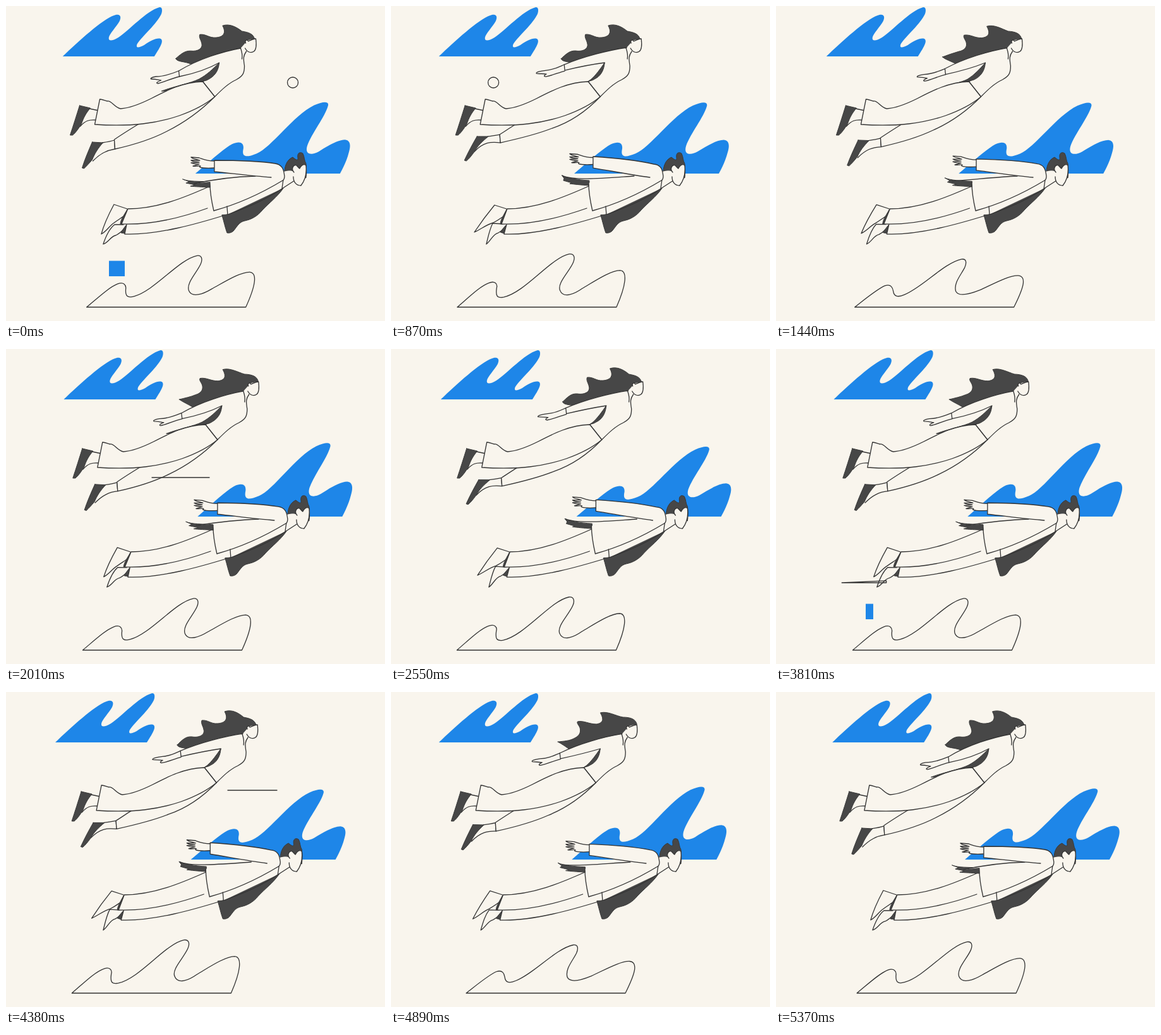
Recreate the animation shown at these times as an HTML page. Size 600 px wide and 500 px high, loop 5400 ms.

```html
<!DOCTYPE html>
<html lang="en">
<head>
<meta charset="utf-8">
<title>Flying figures</title>
<style>
html, body { margin: 0; width: 100%; height: 100%; overflow: hidden; background: #f9f5ed; }
svg { display: block; width: 600px; height: 500px; }
path, circle { stroke-linejoin: round; stroke-linecap: round; }
.line { fill: none; stroke: #333; stroke-width: 1.3; }
.body { fill: #f9f5ed; stroke: #333; stroke-width: 1.3; }
.skin { fill: #f9f5ed; }
.dark { fill: #474747; stroke: #383838; stroke-width: 1; }
.blue { fill: #1e86e8; }
</style>
</head>
<body>
<svg id="stage" viewBox="0 0 600 500"></svg>
<script>
const LOOP = 5400, SWAY = 1800, STEP = 30;
const stage = document.getElementById('stage');
const movers = [];

function add(parent, tag, cls, attrs = {}) {
  const el = document.createElementNS('http://www.w3.org/2000/svg', tag);
  if (cls) el.setAttribute('class', cls);
  set(el, attrs);
  parent.appendChild(el);
  return el;
}
function set(el, attrs) {
  for (const name in attrs) el.setAttribute(name, attrs[name]);
}
const clamp = v => Math.max(0, Math.min(1, v));
const wave = (t, peak, period = SWAY) => Math.cos(2 * Math.PI * (t - peak) / period);

// Blend two paths that share the same commands
function mix(a, b, k) {
  const goal = b.match(/-?[\d.]+/g);
  let i = 0;
  return a.replace(/-?[\d.]+/g, n => (+n + (goal[i++] - n) * k).toFixed(2));
}
const kick = t => 0.5 - 0.5 * wave(t, 0);
const flutter = t => 0.5 - 0.5 * wave(t, 800, 900);

function shape(parent, cls, a, b, amount = kick) {
  const el = add(parent, 'path', cls, { d: a });
  if (b) movers.push(t => el.setAttribute('d', mix(a, b, amount(t))));
  return el;
}
function swaying(mean, reach, peak, extra = () => '') {
  const g = add(stage, 'g');
  movers.push(t => g.setAttribute('transform',
    `translate(${mean + reach * wave(t, peak)} 0) ${extra(t)}`));
  return g;
}

// Clouds
const topCloud = swaying(-7.5, 9, 180);
shape(topCloud, 'blue', 'M90,80 C115,56 152,22 171,15 C182,11 183,18 180,24 C175,33 164,44 163,50 C162,56 168,56 178,50 C195,39 222,8 243,2 C248,1 248,8 246,13 C239,28 217,47 208,60 C205,67 210,67 219,62 C229,55 239,50 245,52 C250,55 246,63 235,80Z');

const sideCloud = swaying(-5.5, 9, 270, t => {
  const s = 1 + 0.027 * wave(t, 250, 900);
  return `translate(0 ${266 * (1 - s)}) scale(1 ${s})`;
});
shape(sideCloud, 'blue', 'M300,266 C322,247 345,226 358,219 C371,213 377,217 376,226 C373,240 380,241 397,234 C420,225 455,173 488,157 C504,150 512,151 510,158 C505,176 484,202 477,222 C473,236 484,237 495,231 C508,223 525,212 537,212 C546,213 546,222 543,232 C540,244 535,255 529,266Z');

const lowCloud = swaying(-10.5, 12.2, 1680);
shape(lowCloud, 'line',
  'M127,478 C145,463 163,446 176,441 C186,437 190,443 189,449 C188,460 191,464 202,461 C235,452 273,402 302,396 C310,395 311,402 308,409 C302,423 284,440 289,452 C294,464 312,457 325,449 C345,438 370,422 385,422 C398,423 394,445 379,478Z',
  'M127,478 C145,464 163,449 175,444 C185,441 187,448 188,453 C189,461 195,463 206,458 C235,446 268,408 296,402 C304,401 304,408 301,415 C295,427 283,440 287,453 C292,462 310,457 325,451 C345,442 372,427 386,428 C400,430 394,448 379,478Z',
  t => 0.2 - 0.45 * wave(t, 450) + 0.2 * wave(t, 0) - 0.35 * wave(t, 0, 900));

// Upper figure
const upper = swaying(-0.5, 6.4, 450);
shape(upper, 'body',
  'M153,217 C160,216 166,215 172,213 L173,227 C160,229 150,234 138,246',
  'M153,207 C160,206 166,205 172,204 L173,217 C158,215 146,216 132,231');
shape(upper, 'dark',
  'M137,216 L154,217 C146,226 141,234 137,244 C132,250 128,254 124,258 L121,257 C125,244 131,230 137,216Z',
  'M136,207 L154,207 C144,215 137,222 132,231 C127,238 123,243 119,246 L116,245 C122,232 129,219 136,207Z');
shape(upper, 'body',
  'M331,144 C310,165 285,184 255,199 C230,212 200,221 173,227 L172,212 C185,203 198,195 211,187',
  'M331,144 C310,166 285,184 255,194 C230,204 200,211 173,217 L172,204 C180,199 187,194 195,189');
shape(upper, 'body', 'M133,163 L147,166 L143,181 C132,180 126,182 118,191');
shape(upper, 'dark', 'M117,158 L134,162 C127,170 123,178 120,187 C115,195 111,201 106,205 L102,205 C107,190 112,174 117,158Z');
shape(upper, 'dark',
  'M269,84 C276,77 282,70 292,71 C304,73 313,68 311,60 C310,54 306,50 308,45 C318,44 322,51 333,50 C346,49 350,42 344,31 C355,27 366,33 374,40 C384,42 392,44 394,53 C386,52 382,54 380,58 C380,62 379,66 372,67 C345,72 315,82 293,92 C285,88 270,90 269,84Z',
  'M271,79 C280,78 290,78 298,73 C306,69 307,63 306,58 C305,53 300,50 302,47 C312,45 320,51 332,51 C344,49 343,42 338,33 C350,30 362,38 374,40 C386,40 394,43 396,51 C386,52 382,54 380,58 C380,62 379,66 372,67 C345,72 315,82 291,92 C285,88 277,82 271,79Z',
  flutter);
shape(upper, 'skin', 'M372,67 L380,58 L383,72 L376,84 L338,90Z');
shape(upper, 'body', 'M381,72 C376,79 376,83 378,95 C378,106 376,111 365,117 C352,123 342,133 331,144 L312,120 C322,114 330,108 338,90');
shape(upper, 'dark',
  'M247,135 C268,127 292,123 306,116 C319,109 328,100 338,90 C337,103 331,112 318,118 C300,122 275,131 252,135Z',
  'M313,119 C313,119 314,118 316,117 C324,110 331,100 338,90 C337,103 331,112 322,116 C319,118 316,119 313,119Z',
  t => clamp(3 * kick(t) ** 2));
shape(upper, 'body', 'M312,120 C280,121 255,134 230,147 C210,157 195,162 182,163 C172,161 168,150 161,151 C157,150 153,148 149,148 L141,188 C200,192 240,186 275,174 C300,165 318,155 331,144Z');
shape(upper, 'body',
  'M274,103 C262,108 250,112 238,112 C230,113 228,116 231,116 C238,116 240,117 246,118 C240,120 237,123 241,123 C250,121 262,115 275,112',
  'M274,93 C265,97 258,101 246,102 C236,103 229,105 230,107 C237,108 240,107 246,108 C242,110 241,112 245,112 C256,110 264,106 275,103');
shape(upper, 'body',
  'M372,67 C345,72 305,84 274,103 L275,112 C300,107 322,99 338,90',
  'M373,66 C345,70 305,80 274,93 L275,102 C300,96 322,92 338,90');
shape(upper, 'line', 'M372,67 C374,73 375,79 374,84');
shape(upper, 'body', 'M379,67 C383,74 389,75 393,72 C397,69 397,60 396,52 C392,52 388,54 384,56 C382,52 378,55 380,59');

// Lower figure
const lower = swaying(-5.6, 11, 300);
shape(lower, 'body',
  'M186,347 L172,347 C163,354 158,366 154,378 C163,375 165,366 174,364 C180,361 184,357 187,354',
  'M188,346 L171,345 C166,355 164,366 161,378 C169,372 171,362 180,360 C184,358 186,356 188,354');
shape(lower, 'dark', 'M191,347 C187,352 184,356 182,360 L188,361Z', 'M193,347 C189,351 186,355 183,359 L189,361Z');
shape(lower, 'body',
  'M350,331 C305,345 240,364 188,362 L191,347',
  'M350,331 C305,345 240,364 189,362 L193,347');
shape(lower, 'body',
  'M192,322 L171,315 C163,330 155,347 151,362 C159,358 163,350 170,345 C178,339 185,335 187,333',
  'M193,322 L174,316 C164,328 152,344 142,359 C153,354 161,347 172,344 C180,340 185,336 188,334');
shape(lower, 'dark', 'M192,323 C187,332 182,338 181,346 L184,346Z', 'M193,323 C189,331 184,338 183,346 L186,346Z');
shape(lower, 'body',
  'M323,286 C285,303 240,322 193,322 L183,346 C230,348 275,337 319,321',
  'M323,286 C285,303 240,322 194,322 L185,346 C230,348 275,337 320,321');
shape(lower, 'dark', 'M342,332 C345,342 347,352 350,360 C354,361 359,359 361,356 C366,350 369,343 378,341 C388,339 398,334 406,324 C416,313 430,303 440,288 L350,331Z');
shape(lower, 'dark',
  'M280,275 C290,279 305,278 323,279 L323,288 C310,287 300,287 292,286 L300,284 L285,281 L290,279Z',
  'M281,269 C290,273 305,276 324,277 L324,285 C310,284 300,283 293,282 L297,281 L283,277 L284,274Z');
shape(lower, 'skin', 'M438,262 L457,259 L458,278 L437,290 L351,331 L350,318Z');
shape(lower, 'line', 'M350,318 L351,331 C385,319 415,305 437,290 L457,277 M439,276 L437,290');
shape(lower, 'skin', 'M438,277 L329,325 L323,281 L395,270 L430,255Z');
shape(lower, 'line', 'M323,281 C323,297 326,312 329,325 C365,315 405,297 438,277');
shape(lower, 'body',
  'M298,282 C325,276 360,271 395,270',
  'M281,269 C300,278 350,273 395,270');
const hand = shape(lower, 'body', 'M330,246 C318,246 312,243 306,241 L293,240 C296,243 302,243 307,245 L293,245 C297,248 302,247 306,248 L293,249 C298,252 302,250 306,251 L296,254 C300,255 304,253 308,254 C302,257 318,258 330,257');
movers.push(t => hand.setAttribute('transform', `translate(0 ${-5.5 * kick(t)})`));
shape(lower, 'body',
  'M420,272 C390,270 360,266 330,263 L330,245 C360,245 400,246 426,250 C440,252 440,264 441,270 C441,274 440,276 438,277',
  'M420,272 C390,268 360,262 330,257 L330,239 C360,241 400,245 426,251 C440,252 440,264 441,270 C441,274 440,276 438,277');
shape(lower, 'dark', 'M441,262 C442,250 447,243 454,240 C459,244 463,247 462,240 C461,233 466,231 470,234 C473,240 472,245 475,250 C476,258 476,266 475,273 L455,262 C450,260 446,261 441,262Z');
shape(lower, 'body', 'M456,264 C451,259 455,251 460,253 C462,255 464,258 465,258 C468,252 472,250 475,253 C476,262 475,275 467,285 C460,285 455,280 455,271');

// Small shapes drifting left
const ball = add(stage, 'circle', 'line', { cy: 121.5 });
movers.push(t => set(ball, {
  cx: 454 - 0.466 * t + 0.00015 * t * t,
  r: 8.5 * clamp((1100 - t) / 150),
  visibility: t < 1100 ? 'visible' : 'hidden'
}));

function square(start) {
  const el = add(stage, 'rect', 'blue', { y: 404.5, height: 24.5 });
  movers.push(time => {
    const t = time - start;
    const width = 25 * Math.min(clamp((t + 450) / 100), clamp((115 - t) / 115));
    set(el, { x: 163 - 0.35 * t, width });
  });
}
square(0);
square(3750);

function streak(mid, x, y, length) {
  const el = add(stage, 'path', 'line');
  movers.push(time => {
    const t = time - mid, size = length * clamp((320 - Math.abs(t)) / 150);
    const left = x - 0.38 * t;
    el.setAttribute('d', size ? `M${left},${y} h${size}` : '');
  });
}
streak(2010, 231, 204, 91);
streak(4380, 351, 156, 78);

const sail = add(stage, 'path', 'line');
movers.push(time => {
  const t = time - 3120;
  const x = 373 - 0.5 * t + 0.00016 * t * t;
  const height = 46 * Math.min(clamp((t + 180) / 150), clamp((715 - t) / 380));
  const shown = t > -180 && t < 1010;
  sail.setAttribute('d', shown ? `M${x},371 h70.5 v${-height}Z` : '');
});

function draw(time) {
  const t = Math.floor((time % LOOP) / STEP) * STEP;
  movers.forEach(move => move(t));
}
const begun = performance.now();
function tick() {
  draw(performance.now() - begun);
  requestAnimationFrame(tick);
}
draw(0);
requestAnimationFrame(tick);
</script>
</body>
</html>
```
